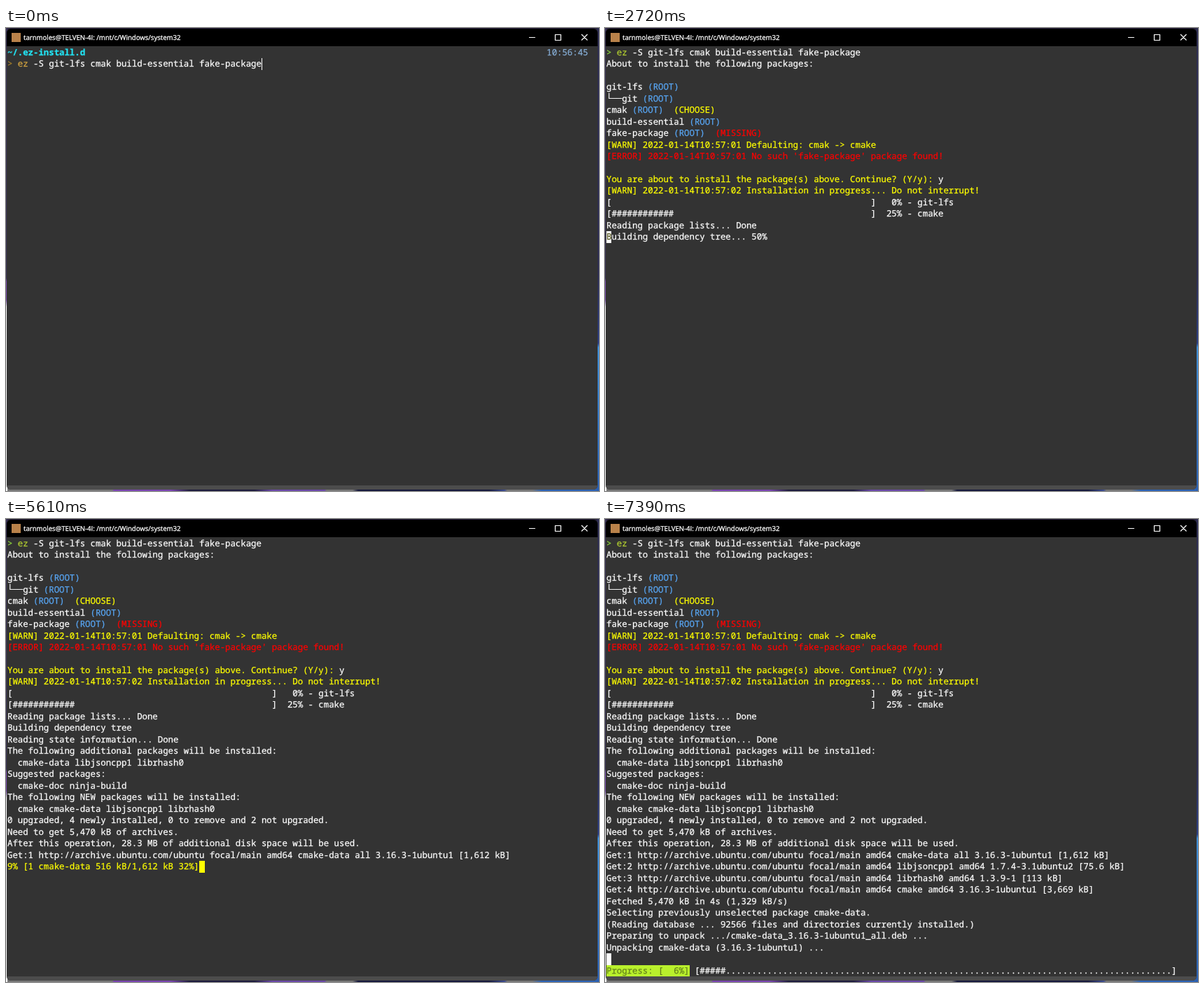
An HTML page for the animation above (8 s loop, 847x661 px).

```html
<!DOCTYPE html>
<html lang="en">
<head>
<meta charset="utf-8">
<title>Terminal</title>
<style>
  html, body { margin: 0; width: 100%; height: 100%; overflow: hidden; }
  body {
    position: relative;
    background:
      linear-gradient(#3a3358 357px, #7d4fb4 362px 388px, #fff 398px) 0 0 / 2px 100% no-repeat,
      linear-gradient(#2c2c50 350px, #2a3c80 450px, #3f8fd8 456px, #2a5fb0) 100% 0 / 3px 100% no-repeat,
      linear-gradient(90deg, #777 152px, #7a45b0 154px 235px, #1c1a3c 262px 355px, #6a48a8 380px 455px,
        #777 458px 495px, #15183c 503px 690px, #3a4a90 712px, #777 716px 752px, #2c62b4 765px) 0 100% / 100% 4px no-repeat,
      #2b2440;
  }
  #win {
    position: absolute; left: 1px; top: 1px; width: 844px; height: 658px;
    border-radius: 6px; overflow: hidden; background: #333;
  }
  #bar { height: 25px; background: #000; }
  #foot { position: absolute; bottom: 0; width: 100%; height: 6px; background: #4c4c4c; }
  #icon { position: absolute; left: 8px; top: 7px; width: 13px; height: 13px; background: #b9824a; }
  #title {
    position: absolute; left: 25px; top: 6px; color: #fff; white-space: pre;
    font: 9.6px/15px "Open Sans", "Noto Sans", sans-serif; text-rendering: geometricPrecision;
    -webkit-text-stroke: .3px;
  }
  svg { position: absolute; left: 0; top: 0; fill: none; stroke: #fff; stroke-width: 1.2; }
  .row, #cursor {
    position: absolute; left: 2px; height: 16.49px; white-space: pre; color: #fff;
    font: 12.35px/16.49px "Noto Sans Mono", "DejaVu Sans Mono", monospace;
    text-rendering: geometricPrecision; font-variant-ligatures: none;
    -webkit-text-stroke: .25px;
  }
  #cursor { overflow: hidden; color: #555520; }
  .row span { display: inline-block; height: 16.49px; vertical-align: top; }
</style>
</head>
<body>
<div id="win"><div id="bar"></div><div id="foot"></div></div>
<div id="icon"></div>
<div id="title">tarnmoles@TELVEN-4I: /mnt/c/Windows/system32</div>
<svg width="847" height="27"><path d="M747 13.5h9M784.5 9.5h8v8h-8zM822 9l8.5 8.5M830.5 9l-8.5 8.5"/></svg>
<div id="term"></div>
<div id="cursor"></div>
<script>
const LOOP = 8000, CELL = 7.41, LINE = 16.49, LEFT = 2, TOP = 26.6, ROWS = 38;

// Text markup: "|k" switches to the colour with key k.
const colors = {
  w: '#fff', y: '#ff0', r: '#f00', b: '#58a6f4', c: '#22e4f4', t: '#87afd7',
  o: '#a8802a', g: '#d7a640', l: '#8ed83c', e: '#b4d030', p: '#64801c'
};
const steps = [];
const plain = s => s.replace(/\|./g, '');

// Writes lines from a row on; the cursor goes to the end of the last line unless col is given.
function step(time, row, lines, { col, color = '#fff', thin } = {}) {
  const last = lines.length - 1;
  steps.push({ time, row, lines, cursor: {
    row: row + last, col: col ?? plain(lines[last]).length, color, thin
  } });
}

const args = '|w -S git-lfs cmak build-essential fake-package';
const root = '|b(ROOT)';
const bar = (pct, name) =>
  '[' + '#'.repeat(pct / 2).padEnd(50) + ']' + `${pct}%`.padStart(5) + ' - ' + name;
const fetchLine = (n, rest) => `Get:${n} http://archive.ubuntu.com/ubuntu focal/main amd64 ${rest}`;
const status = (total, rest) => `|y${total}% [${rest}]`;
const progress = (pct, done) =>
  `|pProgress: [${String(pct).padStart(3)}%]|w [${'#'.repeat(done).padEnd(91, '.')}]`;

step(0, 0, ['|c~/.ez-install.d' + ' '.repeat(89) + '|t10:56:45', '|o> |gez' + args], { thin: true });
step(500, 0, ['|l> |eez' + args, '']);
step(550, 1, ['About to install the following packages:', '', '']);
step(600, 3, ['git-lfs ' + root, '└──git ' + root, '']);
step(650, 5, ['cmak ' + root + '|y  (CHOOSE)', '']);
step(700, 6, ['build-essential ' + root, 'fake-package ' + root + '|r  (MISSING)', '']);
step(760, 8, ['|y[WARN] 2022-01-14T10:57:01 Defaulting: cmak -> cmake',
  "|r[ERROR] 2022-01-14T10:57:01 No such 'fake-package' package found!", '']);
const ask = '|yYou are about to install the package(s) above. Continue? (Y/y): ';
step(810, 11, [ask]);
step(1610, 11, [ask + '|wy']);
step(1810, 12, ['']);
step(1840, 12, ['|y[WARN] 2022-01-14T10:57:02 Installation in progress... Do not interrupt!', '']);
step(1880, 13, [bar(0, 'git-lfs'), '']);
step(2380, 14, [bar(25, 'cmake'), '']);

step(2680, 15, ['Reading package lists... 0%'], { col: 0 });
step(2720, 15, ['Reading package lists... Done', 'Building dependency tree... 50%'], { col: 0 });
step(2810, 16, ['Building dependency tree', 'Reading state information... 0%'], { col: 0 });
step(2850, 17, ['Reading state information... Done', '']);
step(2890, 18, ['The following additional packages will be installed:',
  '  cmake-data libjsoncpp1 librhash0', 'Suggested packages:', '  cmake-doc ninja-build', '']);
step(2930, 22, ['The following NEW packages will be installed:',
  '  cmake cmake-data libjsoncpp1 librhash0',
  '0 upgraded, 4 newly installed, 0 to remove and 2 not upgraded.',
  'Need to get 5,470 kB of archives.',
  'After this operation, 28.3 MB of additional disk space will be used.', '']);
step(2980, 27, [status(0, 'Working')]);
step(3440, 27, [status(0, 'Waiting for headers')]);

const first = (time, total, size, pct) =>
  step(time, 28, [status(total, `1 cmake-data ${size} kB/1,612 kB ${pct}%`)], { color: '#ff0' });
step(3610, 27, [fetchLine(1, 'cmake-data all 3.16.3-1ubuntu1 [1,612 kB]'), '']);
first(3610, 0, '14.2', 1);
first(4110, 1, '56.6', 4);
first(4610, 2, '148', 9);
first(5110, 5, '295', 18);
first(5610, 9, '516', 32);
first(6110, 17, '1,078', 67);
first(6150, 25, '1,506', 93);
step(6310, 28, [fetchLine(2, 'libjsoncpp1 amd64 1.7.4-3.1ubuntu2 [75.6 kB]'),
  status(29, '2 libjsoncpp1 25.5 kB/75.6 kB 34%')]);
step(6350, 29, [fetchLine(3, 'librhash0 amd64 1.3.9-1 [113 kB]'),
  fetchLine(4, 'cmake amd64 3.16.3-1ubuntu1 [3,669 kB]'), status(34, '4 cmake 32.8 kB/3,669 kB 1%')]);
step(6880, 31, [status(68, '4 cmake 1,914 kB/3,669 kB 52%')]);
step(7050, 31, ['Fetched 5,470 kB in 4s (1,329 kB/s)', '']);

step(7320, 37, [progress(0, 0)]);
step(7320, 32, ['Selecting previously unselected package cmake-data.', '']);
step(7350, 33, ['(Reading database ... 92566 files and directories currently installed.)', '']);
step(7390, 37, [progress(6, 5)]);
step(7390, 34, ['Preparing to unpack .../cmake-data_3.16.3-1ubuntu1_all.deb ...',
  'Unpacking cmake-data (3.16.3-1ubuntu1) ...', '']);

const term = document.getElementById('term');
const cursorBox = document.getElementById('cursor');
const rowTop = row => TOP + row * LINE + 'px';
const rowBoxes = Array.from({ length: ROWS }, (_, i) => {
  const box = document.createElement('div');
  box.className = 'row';
  box.style.top = rowTop(i);
  term.append(box);
  return box;
});

function drawRow(box, text) {
  box.replaceChildren();
  for (const part of (text[0] === '|' ? text : '|w' + text).split('|').slice(1)) {
    const span = document.createElement('span'), key = part[0];
    span.textContent = part.slice(1);
    span.style.color = colors[key];
    if (key === 'c') span.style.fontWeight = 'bold';
    if (key === 'p') span.style.background = '#b9f02c';
    box.append(span);
  }
}

function draw(count) {
  const rows = Array(ROWS).fill('');
  for (const s of steps.slice(0, count)) s.lines.forEach((line, i) => rows[s.row + i] = line);
  rows.forEach((text, i) => drawRow(rowBoxes[i], text));
  const { row, col, color, thin } = steps[count - 1].cursor;
  cursorBox.textContent = plain(rows[row])[col] || '';
  Object.assign(cursorBox.style, {
    left: LEFT + col * CELL + 'px', top: rowTop(row),
    width: thin ? '1px' : CELL + 'px', background: color
  });
}

const start = performance.now();
let shown = 0;
function tick() {
  const t = (performance.now() - start) % LOOP;
  const count = steps.filter(s => s.time <= t).length;
  if (count !== shown) draw(shown = count);
  requestAnimationFrame(tick);
}
tick();
</script>
</body>
</html>
```
